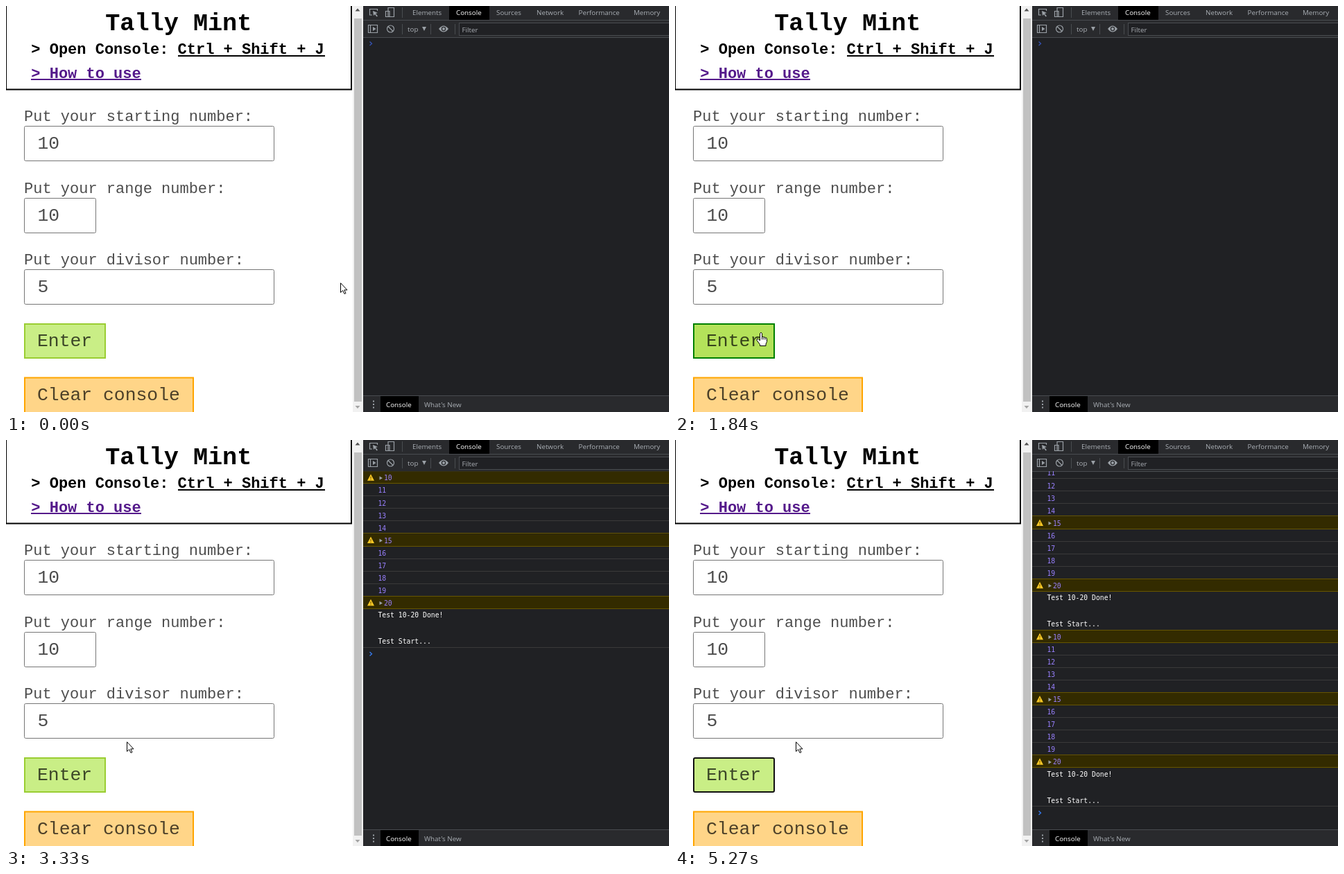
Recreate the animation shown at these times as an HTML page. Size 956 by 586 pixels, loop 6840 ms.

```html
<!DOCTYPE html>
<html lang="en">
<head>
<meta charset="utf-8">
<title>Number range tester</title>
<style>
  html, body { margin: 0; width: 100%; height: 100%; overflow: hidden; background: #fff; }
  svg { display: block; width: 956px; height: 586px; }
  text { white-space: pre; }
  .page { font-family: "Liberation Mono", monospace; font-size: 22px; }
  .page text { fill-opacity: .7; }
  .page .bold { font-weight: 700; fill-opacity: 1; }
  .page .big { font-size: 26.4px; }
  .field { fill: #fff; stroke: #767676; }
  .ui { font-family: "Open Sans", sans-serif; font-size: 9.8px; fill: #aaafb5; }
  .ui .on { fill: #fff; }
  .log { font-family: "DejaVu Sans Mono", monospace; font-size: 9.75px; fill: #fff; }
  .log .num { fill: #9980ff; }
  .icon { fill: none; stroke: #9aa0a6; stroke-width: 1.2; }
</style>
</head>
<body>
<svg viewBox="0 0 956 586" xmlns="http://www.w3.org/2000/svg">
  <defs>
    <clipPath id="pane"><rect x="515" y="45" width="441" height="517"/></clipPath>
  </defs>

  <rect width="515" height="586" fill="#fff"/>
  <g class="page">
    <path d="M0 0V120.500H498V0" fill="none" stroke="#000" stroke-width="2"/>
    <text class="bold" x="143.2" y="35" font-size="35.2">Tally Mint</text>
    <text class="bold" x="36.3" y="69">&gt; Open Console: Ctrl + Shift + J</text>
    <rect x="248" y="71" width="212" height="2" fill="#000"/>
    <text class="bold" x="36.3" y="104" fill="#551a8b">&gt; How to use</text>
    <rect x="36" y="105" width="159" height="2" fill="#551a8b"/>

    <text x="26" y="166">Put your starting number:</text>
    <rect class="field" x="26.5" y="173.5" width="360" height="50" rx="2"/>
    <text class="big" x="45.5" y="206">10</text>

    <text x="26" y="270">Put your range number:</text>
    <rect class="field" x="26.5" y="277.5" width="103" height="50" rx="2"/>
    <text class="big" x="45.5" y="309.5">10</text>

    <text x="26" y="373">Put your divisor number:</text>
    <rect class="field" x="26.5" y="380.5" width="360" height="50" rx="2"/>
    <g id="focus">
      <rect x="27" y="381" width="359" height="49" rx="2" fill="#fff" stroke="#101010" stroke-width="2"/>
      <rect x="354" y="391" width="13" height="30" fill="#efefef"/>
      <path d="M357 401l3.5-4 3.5 4zM357 411l3.5 4 3.5-4z" fill="#505050"/>
    </g>
    <text class="big" x="45.5" y="413">5</text>
    <rect id="caret" x="61" y="391" width="1" height="30" fill="#000"/>

    <rect id="enter" x="27" y="459" width="116" height="49" stroke-width="2"/>
    <text class="big" x="45" y="491">Enter</text>
    <rect x="27" y="536.500" width="243" height="60" fill="#ffd588" stroke="#ffa500" stroke-width="2"/>
    <text class="big" x="45" y="569">Clear console</text>
  </g>

  <rect x="500" width="15" height="586" fill="#f1f1f1"/>
  <rect x="502" y="18" width="11" height="553" fill="#c1c1c1"/>
  <path d="M503.500 7.500l3.500-4 3.500 4z" fill="#505050"/>
  <path d="M503.500 577l3.500 4 3.500-4z" fill="#a3a3a3"/>

  <rect x="515" width="441" height="586" fill="#202124"/>
  <path d="M515 0H956V45H515zM515 563H956V586H515z" fill="#292a2d"/>
  <path d="M515 20.500H956M515 45.500H956M515 562.500H956M571.500 2V17M571.500 26V41M612.500 26V41M647.500 26V41" stroke="#494c50" fill="none"/>
  <path d="M639 0H697V20H639zM540 563H595V586H540z" fill="#000"/>
  <rect x="653.500" y="24.500" width="310" height="18" fill="#202124" stroke="#494c50"/>

  <g class="icon">
    <path d="M528 13H524.500V4.500H535.500V7"/>
    <path d="M529 7l7 3-3 1 3 3.500-1.500 1-2.500-3.500-2 2z" fill="#9aa0a6" stroke="none"/>
    <path d="M551 2.500H559.500V15.500H551zM547.500 7.500H553V15.500H547.500z"/>
    <path d="M522.500 27.500H535.500V38.500H522.500zM525.500 27V39"/>
    <path d="M529 30l4.500 3-4.500 3z" fill="#9aa0a6" stroke="none"/>
    <circle cx="554.500" cy="33" r="5"/>
    <path d="M551 29.500l7 7"/>
    <path d="M624 33Q631 24 638 33Q631 42 624 33z" fill="#9aa0a6" stroke="none"/>
    <circle cx="631" cy="33" r="2.600" fill="#9aa0a6" stroke="#292a2d"/>
    <path d="M600 30h6l-3 6z" fill="#9aa0a6" stroke="none"/>
    <path d="M529 569.500h2v2h-2zM529 574h2v2h-2zM529 578.500h2v2h-2z" fill="#9aa0a6" stroke="none"/>
  </g>
  <g class="ui">
    <text x="586" y="13">Elements</text>
    <text class="on" x="649" y="13">Console</text>
    <text x="707" y="13">Sources</text>
    <text x="765" y="13">Network</text>
    <text x="825.500" y="13">Performance</text>
    <text x="905" y="13">Memory</text>
    <text x="579" y="37">top</text>
    <text x="657.500" y="38">Filter</text>
    <text class="on" x="548" y="578.500">Console</text>
    <text x="603" y="578.500">What's New</text>
  </g>
  <g clip-path="url(#pane)"><g class="log" id="log"></g></g>

  <g id="key">
    <rect x="443" y="549" width="72" height="37" fill="#000"/>
    <text x="446" y="576" fill="#fff" font-family="'Open Sans', sans-serif" font-size="24" font-weight="700">Enter</text>
  </g>

  <g id="arrow">
    <path d="M.5.8V14.500L3.700 11.600 6 16.500 8 15.600 5.800 10.900H10z" fill="#fff" stroke="#000"/>
  </g>
  <g id="beam">
    <path d="M-3-6.500H-1L0-5.500 1-6.500H3M0-5.500V5.500M-3 6.500H-1L0 5.500 1 6.500H3" fill="none" stroke="#000"/>
  </g>
  <g id="hand">
    <path d="M-1.500 1.500Q0-1 1.500 1.500V7Q3 5.500 4 7.200 5.500 6 6.300 8 8.300 7 8.500 9.500V13.500L7 17V19.500H-1.500V17.500L-6 11.500Q-6.500 9-4 9.500L-1.500 12z" fill="#fff" stroke="#000"/>
    <path d="M1.500 7V10.500M4 7.500V10.500M6.300 8.500V10.500" stroke="#000" fill="none"/>
  </g>
</svg>
<script>
const LOOP = 6840, ROW = 18.05, DONE = 56, TOP = 45.2;
const $ = id => document.getElementById(id);
const show = (id, on) => $(id).style.display = on ? "" : "none";

// Mouse moves: start, end, step length
const moves = [[330, 680, 70], [960, 1630, 67], [2970, 3330, 72]];
// Mouse way: time, x, y, easing power out of the previous point
const way = [
  [260, 482, 399, 1], [680, 234, 418, 1.7], [893, 234, 418, 1],
  [1429, 133, 463, 1.5], [1630, 124, 471, 1], [2898, 124, 471, 1], [3330, 174, 435, 1.6]
];
// Console: time, rows in run 1, rows in run 2, warning icons, arrows, scroll
const steps = [
  [0, 0, 0, 0, 0, 0],
  [2040, 1, 0, 0, 0, 0], [2108, 3, 0, 1, 0, 0], [2165, 5, 0, 1, 0, 0],
  [2240, 8, 0, 1, 0, 0], [2310, 11, 0, 2, 0, 0], [2380, 12, 0, 3, 3, 0],
  [4340, 12, 2, 3, 3, 0], [4410, 12, 5, 4, 3, 0], [4475, 12, 8, 4, 3, 0],
  [4680, 12, 12, 5, 3, 25], [4750, 12, 12, 6, 6, 25]
];

function snap(t) {
  for (const [a, b, d] of moves)
    if (t >= a && t < b) return a + Math.floor((t - a) / d) * d;
  return t;
}

function mouse(t) {
  const i = way.findIndex(p => p[0] > t);
  if (i === 0) return way[0].slice(1, 3);
  if (i < 0) return way[way.length - 1].slice(1, 3);
  const a = way[i - 1], b = way[i];
  const k = 1 - Math.pow(1 - (t - a[0]) / (b[0] - a[0]), b[3]);
  return [a[1] + (b[1] - a[1]) * k, a[2] + (b[2] - a[2]) * k];
}

const inside = (x, y, l, t, r, b) => x >= l && x <= r && y >= t && y <= b;
const text = (x, y, s, c = "") => `<text class="${c}" x="${x}" y="${y}">${s}</text>`;
const rule = (y, c) => `<path d="M515 ${Math.round(y) - .5}H956" stroke="${c}"/>`;

function warning(y, icon, arrow) {
  let s = `<rect x="515" y="${y}" width="441" height="${ROW}" fill="#332b00"/>`;
  s += rule(y, "#665500") + rule(y + ROW, "#665500");
  if (icon) s += `<path d="M526 ${y + 4}l5 9.500h-10z" fill="#fbc926"/>
    <path d="M526 ${y + 7.5}v3m0 1v1.200" stroke="#5c4a00"/>`;
  if (arrow) s += `<path d="M538.500 ${y + 7}l4.500 2.700-4.500 2.700z" fill="#9aa0a6"/>`;
  return s;
}

function consoleLog([, run1, run2, icons, arrows, scroll]) {
  let y = TOP - scroll, s = "", warns = 0, late = "";
  for (const rows of [run1, run2]) {
    for (let i = 0; i < Math.min(rows, 11); i++, y += ROW) {
      const warn = i % 5 === 0;
      if (warn) {
        late += warning(y, warns < icons, warns < arrows);
        warns++;
      } else s += rule(y + ROW, "#3a3a3a");
      late += text(warn ? 545 : 536.5, y + 13.2, 10 + i, "num");
    }
    if (rows > 11) {
      s += text(536.5, y + 12.5, "Test 10-20 Done!") + text(536.5, y + 50.5, "Test Start...");
      y += DONE;
      s += rule(y, "#3a3a3a");
    }
  }
  const blue = run1 === 12 && run2 % 12 === 0 ? "#367cf1" : "#3553b5";
  return s + late + `<path d="M524.500 ${y + 6.3}l3 2.700-3 2.700" fill="none" stroke="${blue}" stroke-width="1.300"/>`;
}

let last;
function draw(t) {
  const step = steps.filter(s => s[0] <= t).pop();
  if (step !== last) $("log").innerHTML = consoleLog(last = step);

  const focus = t >= 70 && t < 1840;
  show("focus", focus);
  show("caret", focus && (t < 675 || t >= 1160 && t < 1700));
  show("key", t >= 4340 && t < 5270);

  const [x, y] = mouse(snap(t));
  const hover = inside(x, y, 26, 458, 144, 509);
  const kind = hover ? "hand" : inside(x, y, 26, 380, 387, 431) ? "beam" : "arrow";
  for (const id of ["arrow", "beam", "hand"]) show(id, id === kind);
  $(kind).setAttribute("transform", `translate(${Math.round(x)} ${Math.round(y)})`);

  const ring = t >= 4340, pressed = t >= 1840 && t < 2040;
  const btn = $("enter");
  btn.setAttribute("fill", pressed ? "#b4e25a" : hover ? "#c5f06c" : "#c9ee86");
  btn.setAttribute("stroke", ring ? "#101010" : hover ? "#008000" : "#9acd32");
  btn.setAttribute("rx", ring ? 2 : 0);
}

const start = performance.now();
function tick() {
  draw((performance.now() - start) % LOOP);
  requestAnimationFrame(tick);
}
tick();
</script>
</body>
</html>
```
